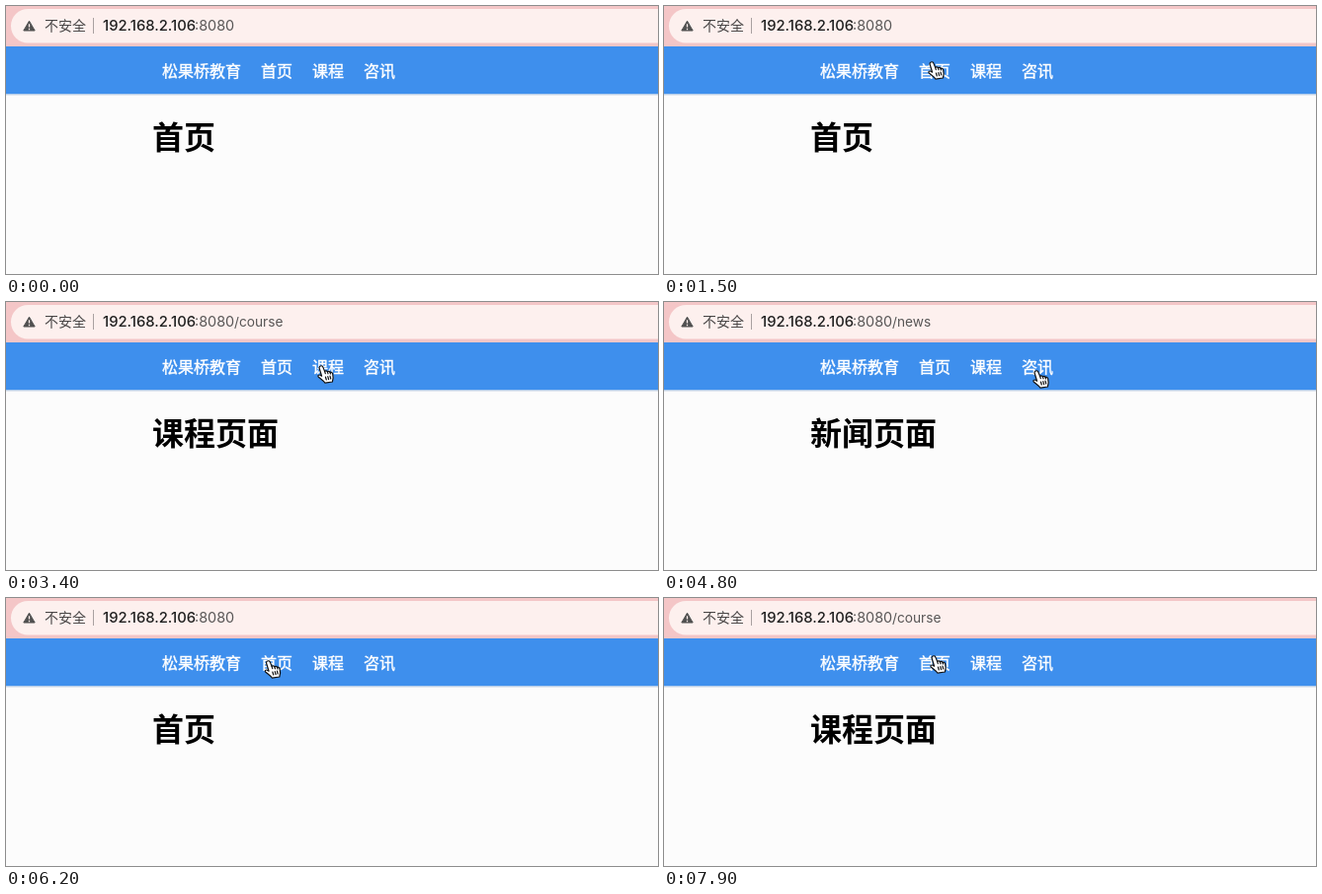
Animation of 660x272 px, one loop 8000 ms. Source, as an HTML page:

```html
<!DOCTYPE html>
<html lang="zh-CN">
<head>
<meta charset="utf-8">
<title>Navigation</title>
<style>
  html, body { margin: 0; width: 100%; height: 100%; overflow: hidden; background: #fcfcfc; }
  svg { display: block; font-family: Inter, "Noto Sans CJK SC", "Noto Sans CJK", sans-serif; }
  .address { font-size: 14.4px; fill: #585656; }
  .nav { font-size: 16px; font-weight: 500; fill: #fff; stroke: #fff; stroke-width: .4; }
  #title { font-size: 32px; font-weight: 700; }
</style>
</head>
<body>
<svg width="660" height="272" viewBox="0 0 660 272">
  <defs>
    <linearGradient id="shade" x2="0" y2="1">
      <stop stop-color="#c9d4e2"/>
      <stop offset="1" stop-color="#fcfcfc"/>
    </linearGradient>
  </defs>
  <rect width="660" height="272" fill="#fcfcfc"/>

  <rect width="660" height="42" fill="#f4c6c7"/>
  <rect x="5" y="3" width="690" height="34.5" rx="17.2" fill="#fdf0ee"/>
  <path d="M23.5 15.2L29.2 25H17.8Z" fill="#505050" stroke="#505050" stroke-linejoin="round"/>
  <path d="M23.5 18.2V21.6M23.5 22.8V24.2" stroke="#fdf0ee" stroke-width="1.3"/>
  <path d="M88.5 12V28" stroke="#a9a0a0"/>
  <g class="address">
    <text x="39" y="25.3" font-size="14" fill="#484646">不安全</text>
    <text x="98" y="25.3" font-size="14.8" font-weight="500" fill="#202020">192.168.2.106</text>
    <text x="191" y="25.3">:8080</text>
    <text id="path" x="231" y="25.3" font-size="13.7"></text>
  </g>

  <rect y="41" width="660" height="48.5" fill="#3e8fed"/>
  <rect y="89.5" width="660" height="2" fill="url(#shade)"/>
  <g class="nav">
    <text x="158" y="71.5">松果桥教育</text>
    <text x="258" y="71.5">首页</text>
    <text x="310" y="71.5">课程</text>
    <text x="362" y="71.5">咨讯</text>
  </g>
  <text id="title" x="148" y="145.3"></text>

  <g id="hand" stroke="#111" stroke-width="1.2" stroke-linejoin="round" stroke-linecap="round">
    <path fill="#fff" d="M3.2 1C4.8 .2 5.6 1.4 6 2.4L7.6 6.4C8.6 5.4 10 5.8 10.4 6.8C11.4 6 12.6 6.4 13 7.4
      C14.4 6.8 15.3 7.6 15.7 9C16.4 11.6 16.6 13.4 15.4 17L8 18.2C6.5 15.8 3.5 14 1.2 12
      C.2 10.6 1.6 9.6 3 10.2L4.6 11.2L2.3 3.8C1.8 2.6 2.2 1.4 3.2 1Z"/>
    <path fill="none" d="M7.6 6.4L8.3 8.6M10.4 6.8L11 8.8M13 7.4L13.5 9M8.4 12L9.3 15M10.8 11.6L11.6 14.6M13 11.2L13.7 14"/>
  </g>
</svg>
<script>
  const LOOP = 8000, STEP = 100;
  const home = ["首页", ""], course = ["课程页面", "/course"], news = ["新闻页面", "/news"];

  // Start time and page
  const visits = [[0, home], [3400, course], [4400, news], [5900, home], [7100, course]];

  // Time and top-left corner of the hand
  const moves = [
    [800, 372, 72], [1400, 267, 56], [2300, 267, 56], [3100, 315, 64], [3800, 315, 64],
    [4300, 373, 69], [4800, 373, 69], [5500, 209, 63], [6000, 209, 63], [6500, 358, 63],
    [6800, 332, 61], [7000, 318, 62], [7300, 318, 62], [7900, 269, 58]
  ];
  const get = id => document.getElementById(id);
  const ease = p => p * p * (3 - 2 * p);

  function handAt(time) {
    const next = moves.findIndex(move => move[0] > time);
    if (next < 0) return moves.at(-1).slice(1);
    const [t0, x0, y0] = moves[next - 1], [t1, x1, y1] = moves[next];
    const p = ease((time - t0) / (t1 - t0));
    return [x0 + (x1 - x0) * p, y0 + (y1 - y0) * p];
  }

  function draw(now) {
    const time = Math.floor(now % LOOP / STEP) * STEP;
    const [title, path] = visits.findLast(visit => visit[0] <= time)[1];
    get("title").textContent = title;
    get("path").textContent = path;

    const visible = time >= moves[0][0];
    get("hand").style.display = visible ? "" : "none";
    if (visible) get("hand").setAttribute("transform", `translate(${handAt(time)})`);
  }

  const start = performance.now();
  function tick() {
    draw(performance.now() - start);
    requestAnimationFrame(tick);
  }
  tick();
</script>
</body>
</html>
```
